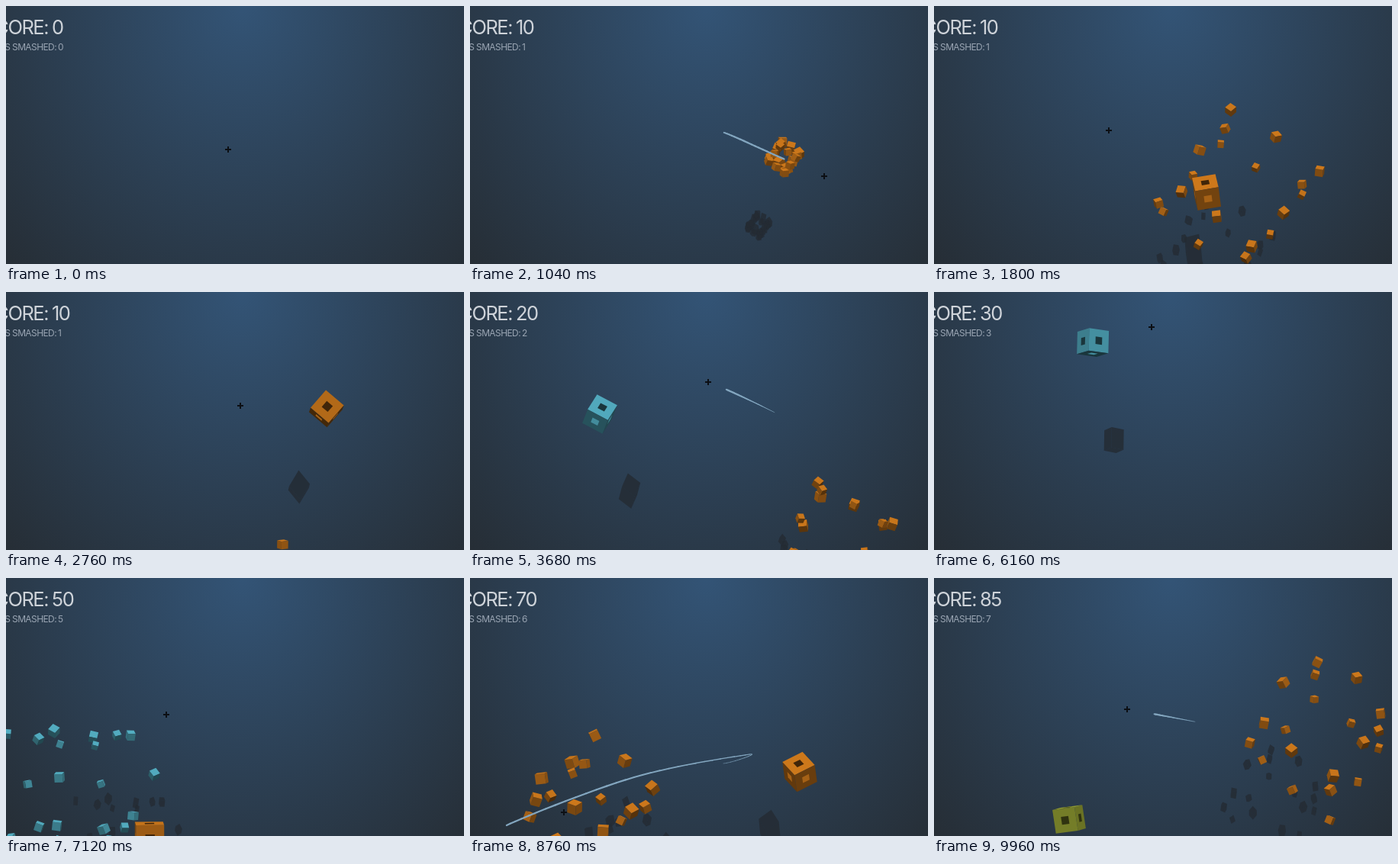
Recreate the animation shown at these times as an HTML page with a canvas. Size 600 by 338 pixels, loop 10000 ms.

```html
<!DOCTYPE html>
<html lang="en">
<head>
<meta charset="utf-8">
<title>Cube smashing game</title>
<style>
  html, body { margin: 0; width: 100%; height: 100%; overflow: hidden; }
  body {
    position: relative;
    background: radial-gradient(430px 478px at 310px 0, #335476, #262e36);
    font-family: Inter, sans-serif;
  }
  canvas { position: absolute; left: 0; top: 0; }
  p { position: absolute; margin: 0; white-space: nowrap; line-height: 1; }
  p span { position: absolute; left: 100%; }
  #score { right: calc(100% - 55px); top: 15px; font-size: 25.5px; letter-spacing: -1.5px; color: #ced3d9; }
  #score span { margin-left: 5px; }
  #count { right: calc(100% - 66px); top: 48px; font-size: 12px; letter-spacing: -.6px; color: #9aa5b3; }
  #count span { margin-left: 2px; }
</style>
</head>
<body>
<canvas width="600" height="338"></canvas>
<p id="score">SCORE:<span>0</span></p>
<p id="count">CUBES SMASHED:<span>0</span></p>
<script>
const ctx = document.querySelector('canvas').getContext('2d');
const scoreText = document.querySelector('#score span');
const countText = document.querySelector('#count span');
const LOOP = 10000, STEP = 40, GRAVITY = 0.0003, SPREAD = 0.065;
const ORANGE = [254, 149, 34], TEAL = [103, 215, 240], GREEN = [190, 205, 65];

// time, score, cubes smashed
const scores = [[0, 0, 0], [1000, 10, 1], [3100, 20, 2], [4160, 30, 3], [6320, 40, 4],
  [6560, 50, 5], [7600, 60, 5], [8200, 70, 6], [9200, 85, 7]];

// Each cube is thrown through two [time, x, y] points and bursts at `hit`.
const cubes = [
  { color: ORANGE, size: 30, pose: [.6, .4, .1], from: [100, 430, 380], to: [1800, 395, 245], hit: 1000 },
  { color: ORANGE, size: 31, pose: [.6, .06, -.13], from: [1800, 357, 244], to: [3680, 480, 325], hit: 3100 },
  { color: TEAL, size: 30, pose: [.87, -.15, .37], from: [3680, 170, 160], to: [5160, 95, 340], hit: 4160 },
  { color: TEAL, size: 30, pose: [.2, 0, .78], from: [5160, 326, 153], to: [7120, 95, 265], hit: 6320 },
  { color: ORANGE, size: 37, pose: [.12, .04, 0], from: [7120, 188, 340], to: [8760, 155, 295], hit: 8200 },
  { color: ORANGE, size: 31, pose: [.77, .45, -.14], from: [8760, 432, 254], to: [9960, 510, 207], hit: 9200 },
  { color: GREEN, size: 31, pose: [.05, -.35, -.15], from: [9960, 177, 316], to: [10500, 200, 230], hit: Infinity },
];

// A smashed cube falls apart into the 20 cells of a sponge.
const cells = [];
for (let i = 0; i < 27; i++) {
  const cell = [i % 3 - 1, Math.floor(i / 3) % 3 - 1, Math.floor(i / 9) - 1];
  if (cell.filter(c => c === 0).length < 2) cells.push(cell);
}

const random = seed => { const v = Math.sin(seed * 127.1) * 43758.5; return v - Math.floor(v); };

function flight({ from: [t0, x0, y0], to: [t1, x1, y1] }, t) {
  const u = (t - t0) / (t1 - t0);
  return [x0 + (x1 - x0) * u, y0 + (y1 - y0) * u - GRAVITY / 2 * (t - t0) * (t1 - t)];
}

// Pointer: resting places as [time, x, y], plus one swipe through every hit
const pointer = [[0, 291, 188], [500, 300, 184], [1800, 229, 163], [2700, 300, 150],
  [3680, 312, 118], [4700, 170, 165], [5040, 206, 160], [5120, 261, 161], [5160, 373, 153],
  [5700, 330, 80], [7120, 210, 179], [8560, 332, 243], [8600, 366, 231], [8660, 215, 261],
  [8720, 48, 324], [8760, 123, 307], [9960, 253, 172], [10000, 250, 173]];
for (const cube of cubes.filter(c => c.hit < LOOP)) {
  const [x, y] = flight(cube, cube.hit), side = x > 300 ? 1 : -1;
  for (const k of [-1, 0, 1]) pointer.push([cube.hit + 80 * k, x + 80 * k * side, y + 35 * k]);
}
pointer.sort((a, b) => a[0] - b[0]);

function rotate([x, y, z], [a, b, c]) {
  const turn = (p, q, r) => [p * Math.cos(r) - q * Math.sin(r), p * Math.sin(r) + q * Math.cos(r)];
  [z, x] = turn(z, x, b);
  [z, y] = turn(z, y, a);
  [x, y] = turn(x, y, c);
  return [x, y, z];
}

function drawCube({ x, y, size, pose, color, hollow }, shadow) {
  ctx.save();
  if (shadow) {
    ctx.translate(.7 * x + 90, .71 * y + 147);
    ctx.scale(.62, .9);
  } else ctx.translate(x, y);
  for (let axis = 0; axis < 3; axis++) for (const sign of [-1, 1]) {
    const local = (n, u, v) => {
      const p = [];
      p[axis] = n; p[(axis + 1) % 3] = u; p[(axis + 2) % 3] = v;
      return rotate(p, pose);
    };
    const [, ny, nz] = local(sign, 0, 0);
    if (nz <= 0) continue;
    const quad = (k, shade) => {
      ctx.beginPath();
      for (const [u, v] of [[-k, -k], [k, -k], [k, k], [-k, k]]) {
        const [px, py] = local(sign, u, v);
        ctx.lineTo(px * size / 2, py * size / 2);
      }
      ctx.fillStyle = shadow ? '#242c34' : `rgb(${color.map(c => c * shade)})`;
      ctx.fill();
    };
    const shade = Math.max(.25, .45 - .3 * ny + .2 * nz);
    quad(1, shade);
    if (hollow && !shadow) quad(1 / 3, shade > .5 ? .25 : .65);
  }
  ctx.restore();
}

// Everything solid that is in the air at time t
function solids(t) {
  const list = [];
  cubes.forEach((cube, n) => {
    const { color, size, hit } = cube, [x, y] = flight(cube, t);
    const age = Math.min(t, hit) - cube.from[0];
    const pose = cube.pose.map((angle, i) => angle + age * [.0008, .0012, .0005][i]);
    if (t < hit) return list.push({ x, y, size, color, pose, hollow: true });
    cells.forEach((cell, i) => {
      const seed = n * 50 + i + 1, spin = (t - hit) * .003;
      const [dx, dy, dz] = rotate(cell, pose);
      const reach = size / 3 + (t - hit) * SPREAD * (.75 + .5 * random(seed));
      list.push({
        x: x + dx * reach, y: y + dy * reach, color, size: size * (.32 + .04 * dz),
        pose: [.5 + .4 * Math.sin(random(seed + .2) * 6 + spin), random(seed + .4) * 6 + spin, random(seed + .6) - .5],
      });
    });
  });
  return list.filter(s => s.y < 380);
}

// Smooth curve through the pointer's points
function pointerAt(t) {
  let i = pointer.findIndex(p => p[0] > t) - 1;
  if (i < 0) i = t <= 0 ? 0 : pointer.length - 2;
  const p = pointer[i], q = pointer[i + 1];
  const before = pointer[i - 1] || p, after = pointer[i + 2] || q;
  const h = q[0] - p[0], u = (t - p[0]) / h;
  return [1, 2].map(k => {
    const m0 = (q[k] - before[k]) / (q[0] - before[0]) * h;
    const m1 = (after[k] - p[k]) / (after[0] - p[0]) * h;
    const d = q[k] - p[k];
    return p[k] + u * (m0 + u * (3 * d - 2 * m0 - m1 + u * (m0 + m1 - 2 * d)));
  });
}

function drawTrail(t) {
  const span = 160, dt = 4;
  ctx.strokeStyle = '#83a6bf';
  for (let age = span; age > 0; age -= dt) {
    const time = t - 40 - age;
    if (time < 0) continue;
    const a = pointerAt(time), b = pointerAt(time + dt);
    if (Math.hypot(b[0] - a[0], b[1] - a[1]) < .45 * dt) continue;
    ctx.lineWidth = .5 + 1.7 * Math.min(1, 1.5 * (1 - age / span));
    ctx.beginPath();
    ctx.moveTo(...a);
    ctx.lineTo(...b);
    ctx.stroke();
  }
}

function drawPointer(t) {
  const [x, y] = pointerAt(t).map(Math.round);
  ctx.fillStyle = '#0c0f14';
  ctx.fillRect(x - 4, y - 1, 8, 2);
  ctx.fillRect(x - 1, y - 4, 2, 8);
}

function draw(now) {
  const t = Math.floor(now % LOOP / STEP) * STEP;
  const [, score, count] = scores.findLast(s => s[0] <= t);
  scoreText.textContent = score;
  countText.textContent = count;
  ctx.clearRect(0, 0, 600, 338);
  ctx.lineCap = 'round';
  const list = solids(t);
  ctx.globalAlpha = .85;
  list.forEach(s => drawCube(s, true));
  ctx.globalAlpha = 1;
  list.forEach(s => drawCube(s, false));
  drawTrail(t);
  drawPointer(t);
}

const began = performance.now();
function frame() {
  draw(performance.now() - began);
  requestAnimationFrame(frame);
}
frame();
</script>
</body>
</html>
```
